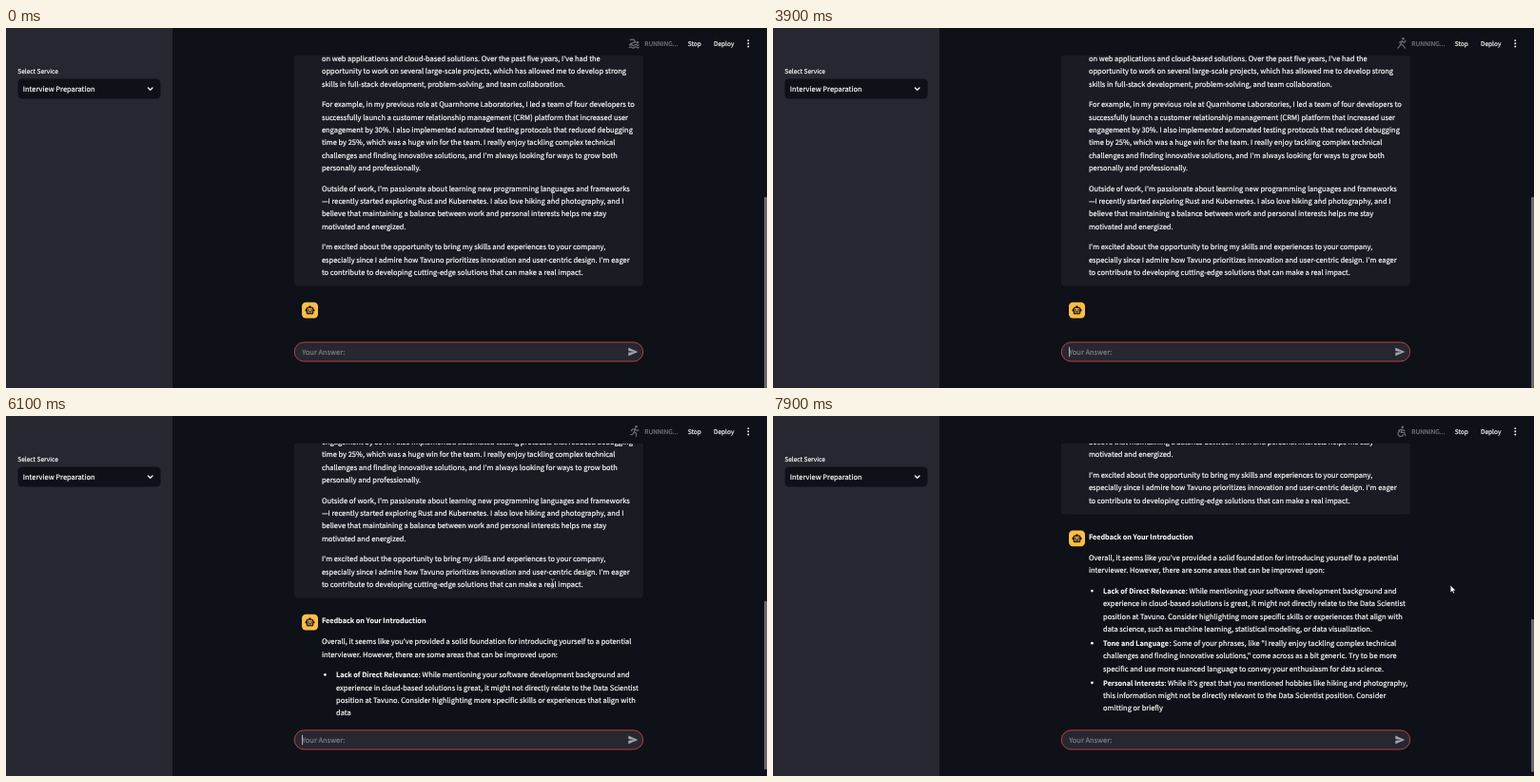
These frames come from a looping animation (800x379 px, 8 s). An HTML page:

```html
<!DOCTYPE html>
<html lang="en">
<head>
<meta charset="utf-8">
<title>Interview Preparation</title>
<style>
  html, body { margin: 0; width: 100%; height: 100%; overflow: hidden; background: #0e1117; }
  svg { display: block; width: 100vw; height: 100vh; }
  text {
    font: 7.49px "Noto Sans CJK JP", "Noto Sans CJK SC", "Noto Sans CJK", "Open Sans", sans-serif;
    color: #fafafa;
    fill: currentColor;
    stroke: currentColor;
    stroke-width: .2px;
    text-rendering: geometricPrecision;
    white-space: pre;
  }
  .small { font-size: 6.55px; }
  .bold { font-weight: 700; font-size: 7.25px; stroke-width: .1px; }
  .line { fill: none; stroke-linecap: round; stroke-linejoin: round; }
</style>
</head>
<body>
<svg viewBox="0 0 800 379" preserveAspectRatio="none">
  <defs>
    <clipPath id="view"><rect x="175" y="29" width="622" height="293.5"/></clipPath>
  </defs>
  <rect width="800" height="379" fill="#0e1117"/>

  <rect width="175" height="379" fill="#262730"/>
  <text class="small" x="12.3" y="47.9">Select Service</text>
  <rect x="12.5" y="53.5" width="150" height="21" rx="4.2" fill="#0e1117"/>
  <text x="17.8" y="66.9">Interview Preparation</text>
  <path class="line" d="M149.4 63l2.3 2.3l2.3-2.3" stroke="#fafafa" stroke-width="1.3"/>

  <g clip-path="url(#view)">
    <g id="page">
      <rect x="303" y="-200" width="367" height="471.8" rx="4.2" fill="#1a1c24"/>
      <g id="answer"></g>
      <rect x="311" y="288.7" width="17" height="16.8" rx="4.2" fill="#ffbd45"/>
      <path transform="translate(314.1 291.7) scale(.45)" fill="#0e1117" fill-rule="evenodd" stroke="#0e1117" stroke-width=".6"
        d="M20 9V7c0-1.1-.9-2-2-2h-3c0-1.66-1.34-3-3-3S9 3.34 9 5H6c-1.1 0-2 .9-2 2v2c-1.66 0-3 1.34-3 3s1.34 3 3 3v4c0 1.1.9 2 2 2h12c1.1 0 2-.9 2-2v-4c1.66 0 3-1.34 3-3s-1.34-3-3-3zM18 19H6V7h12zM9 13a1.5 1.5 0 1 1 0-3a1.5 1.5 0 0 1 0 3zM15 13a1.5 1.5 0 1 1 0-3a1.5 1.5 0 0 1 0 3zM8 15h8v2H8z"/>
      <g id="feedback"></g>
    </g>
  </g>

  <rect x="303.2" y="330.8" width="366.5" height="20.2" rx="10.1" fill="#262730" stroke="#ff4b4b" stroke-width=".7"/>
  <text x="311.2" y="343.6" style="color:#7d7e84">Your Answer:</text>
  <path id="caret" d="M311.6 335.8v10.4" stroke="#fafafa" stroke-width=".7"/>
  <path d="M654.3 336.5L664.3 340.9L654.3 345.3V341.8L661 340.9L654.3 340Z" fill="#a3a5ab"/>

  <g id="sport" class="line" stroke="#6b6e74" stroke-width="1.2">
    <path id="limbs"/>
    <circle id="head" r="1.3" fill="#6b6e74" stroke="none"/>
  </g>
  <text class="small" x="671.3" y="18.5" style="color:#777a80">RUNNING...</text>
  <text class="small" x="716.7" y="18.5">Stop</text>
  <text class="small" x="743.9" y="18.5">Deploy</text>
  <g fill="#fafafa">
    <circle cx="780.3" cy="13.1" r=".95"/><circle cx="780.3" cy="16.3" r=".95"/><circle cx="780.3" cy="19.5" r=".95"/>
  </g>

  <rect id="thumb" x="797" width="3" rx="1" fill="#66686d"/>
  <g id="pointer">
    <path id="arrow" d="M0 0V7.6L1.8 6L3 8.5L4.2 8L3.1 5.6H5.4Z" fill="#fff" stroke="#111" stroke-width=".4"/>
    <path id="beam" class="line" d="M-1.4-5.4Q0-5.4 0-4.5Q0-5.4 1.4-5.4M0-4.5V3.6M-1.4 4.4Q0 4.4 0 3.5Q0 4.4 1.4 4.4" stroke="#b9bbc0" stroke-width=".6"/>
  </g>
</svg>
<script>
const LOOP = 8000, TICK = 100, LINE = 13.34, GAP = 8.34, ITEM_GAP = 1.67;
const LEFT = 331.9, INDENT = 347, FIRST = 298.2, FLOOR = 310.4;
const $ = id => document.getElementById(id);
const clamp = v => Math.max(0, Math.min(1, v));
const ease = v => v * v * (3 - 2 * v);

function make(parent, tag, attrs) {
  const el = document.createElementNS("http://www.w3.org/2000/svg", tag);
  for (const k in attrs) el.setAttribute(k, attrs[k]);
  return parent.appendChild(el);
}

const answer = [
  ["on web applications and cloud-based solutions. Over the past five years, I've had the",
   "opportunity to work on several large-scale projects, which has allowed me to develop strong",
   "skills in full-stack development, problem-solving, and team collaboration."],
  ["For example, in my previous role at Quarnhome Laboratories, I led a team of four developers to",
   "successfully launch a customer relationship management (CRM) platform that increased user",
   "engagement by 30%. I also implemented automated testing protocols that reduced debugging",
   "time by 25%, which was a huge win for the team. I really enjoy tackling complex technical",
   "challenges and finding innovative solutions, and I'm always looking for ways to grow both",
   "personally and professionally."],
  ["Outside of work, I'm passionate about learning new programming languages and frameworks",
   "\u2014I recently started exploring Rust and Kubernetes. I also love hiking and photography, and I",
   "believe that maintaining a balance between work and personal interests helps me stay",
   "motivated and energized."],
  ["I'm excited about the opportunity to bring my skills and experiences to your company,",
   "especially since I admire how Tavuno prioritizes innovation and user-centric design. I'm eager",
   "to contribute to developing cutting-edge solutions that can make a real impact."]
];

const feedback = [
  { bold: "Feedback on Your Introduction", lines: [""], gap: GAP + .3 },
  { lines: [
    "Overall, it seems like you've provided a solid foundation for introducing yourself to a potential",
    "interviewer. However, there are some areas that can be improved upon:"], gap: GAP },
  { bold: "Lack of Direct Relevance", restX: 433.8, gap: ITEM_GAP, lines: [
    ": While mentioning your software development background and",
    "experience in cloud-based solutions is great, it might not directly relate to the Data Scientist",
    "position at Tavuno. Consider highlighting more specific skills or experiences that align with",
    "data science, such as machine learning, statistical modeling, or data visualization."] },
  { bold: "Tone and Language", restX: 416.7, gap: ITEM_GAP, lines: [
    ": Some of your phrases, like \"I really enjoy tackling complex technical",
    "challenges and finding innovative solutions,\" come across as a bit generic. Try to be more",
    "specific and use more nuanced language to convey your enthusiasm for data science."] },
  { bold: "Personal Interests", restX: 411.2, gap: ITEM_GAP, lines: [
    ": While it's great that you mentioned hobbies like hiking and photography,",
    "this information might not be directly relevant to the Data Scientist position. Consider",
    "omitting or briefly"] }
];

const split = s => s ? s.split(" ") : [];
const answerLines = [], rows = [];

let y = 34.9;
for (const para of answer) {
  for (const line of para) {
    const el = make($("answer"), "text", { x: LEFT, y });
    el.textContent = line;
    answerLines.push({ el, y });
    y += LINE;
  }
  y += GAP;
}

// Every row knows the index of its first word in the stream.
let count = 0;
y = FIRST;
for (const block of feedback) {
  const item = !!block.restX, x = item ? INDENT : LEFT;
  block.lines.forEach((line, i) => {
    const head = i ? [] : split(block.bold), body = split(line);
    const row = { y, start: count, head, body, lead: item && !i ? 1 : 0 };
    row.el = make($("feedback"), "g", {});
    if (row.lead) make(row.el, "circle", { cx: 335.4, cy: y - 2.9, r: 1.4, fill: "#fafafa" });
    row.headEl = make(row.el, "text", { x, y, class: "bold" });
    row.bodyEl = make(row.el, "text", { x: head.length && item ? block.restX : x, y });
    count += row.lead + head.length + body.length;
    rows.push(row);
    y += LINE;
  });
  y += block.gap;
}

// Words streamed by time in ms.
const pace = [[4650, 0], [5300, 31.05], [6100, 72.66], [6700, 101.1], [7900, 157.1], [8000, 161]];
function wordsAt(t) {
  for (let i = 1; i < pace.length; i++) {
    const [t0, n0] = pace[i - 1], [t1, n1] = pace[i];
    if (t <= t1) return n0 + (n1 - n0) * clamp((t - t0) / (t1 - t0));
  }
  return count;
}

const wheel = (x, y, r) => `M${x - r} ${y}a${r} ${r} 0 1 0 ${2 * r} 0a${r} ${r} 0 1 0 ${-2 * r} 0`;
const waves = (x, y) => `M${x} ${y}q1.4-1.2 2.7 0t2.7 0t2.7 0t1.6-.5`;
const bike = wheel(657.2, 18.6, 2.7) + wheel(664.2, 18.6, 2.7);
const chair = "M661 13.8L660.3 17.3H663.6L665 20.8M661 14.6L664 15.4M659 16.3";
const sports = [
  { until: 1200, head: [664, 15.2], poses: [
    "M656.2 12.4L660 12.2L662 14.8M656.5 16.6L661.5 14.6" + waves(655.4, 18) + waves(655.4, 20.5),
    "M657.8 11.8L660.4 13L662 15M656.5 16.6L661.5 14.8" + waves(655.4, 18.3) + waves(655.4, 20.7)] },
  { until: 3000, head: [662.3, 11.2], poses: [
    bike + "M664.5 14.7H662L660.6 13L658.6 15L660.8 16.6L660.4 19.2",
    bike + "M664.5 14.7H662L660.6 13L658.6 15L661 16.4V18.6"] },
  { until: 5700, head: [662.4, 11.3], poses: [
    "M661.5 13.4L660 16.7L662.5 18.4L663.5 21M660 16.7L659 19L656.6 20.5M661.3 13.8L658.2 14.6M661.5 14L664.4 16",
    "M661.3 13.4L660 16.7L662.3 18.2L664.2 21.2M660 16.7L658.6 19.4L656.8 21.2M661.3 13.8L658.4 15.2M661.3 14L663.8 15.6L665 13.2"] },
  { until: 6400, head: [662.5, 11.3], poses: [
    "M661.5 13.3L660.3 16.6L661.8 18.6L661 21.3M660.3 16.6L659 18.4L656.4 18M661.3 13.6L659 15.6M661.4 13.8L664 15.6",
    "M661.5 13.3L660.3 16.6L662.6 18.2L662.4 21.2M660.3 16.6L659.2 19L656.6 19.8M661.3 13.5L658.6 13.8L657.4 15.6M661.4 13.8L663 15.4L665 15"] },
  { until: LOOP, head: [661.8, 11.8], poses: [
    chair + "M658.8 15.9a2.9 2.9 0 1 0 3.9 3.6M660.8 14L657.8 13.6",
    chair + "M658.8 15.9a2.9 2.9 0 1 0 3.9 3.6M660.8 14L657.6 15"] }
];

function drawSport(t) {
  const s = sports.find(s => t < s.until);
  $("limbs").setAttribute("d", s.poses[Math.floor(t / TICK) % 2]);
  $("head").setAttribute("cx", s.head[0]);
  $("head").setAttribute("cy", s.head[1]);
}

// Reveals the streamed words; returns the scroll offset and the last baseline.
function drawFeedback(n) {
  const shown = Math.floor(n);
  let scroll = 0, last = FIRST;
  for (const r of rows) {
    const left = shown - r.start;
    r.el.setAttribute("visibility", left > 0 ? "visible" : "hidden");
    const words = Math.max(0, left - r.lead);
    r.headEl.textContent = r.head.slice(0, words).join(" ");
    r.bodyEl.textContent = r.body.slice(0, Math.max(0, words - r.head.length)).join(" ");
    if (left > 0) {
      last = r.y;
      scroll += (Math.max(0, r.y - FLOOR) - scroll) * clamp((n - r.start) / 2.6);
    }
  }
  return { scroll, last };
}

function drawPointer(t, scroll) {
  const k = ease(clamp((t - 6200) / 400));
  const px = 574.6 + 137.6 * k, py = 177 + 1.2 * k;
  const overText = answerLines.some(l => {
    const dy = py + scroll - l.y;
    return dy > -9.6 && dy < 3.7 && px < LEFT + l.el.getComputedTextLength();
  });
  $("pointer").setAttribute("transform", `translate(${px} ${py})`);
  $("beam").setAttribute("visibility", overText ? "visible" : "hidden");
  $("arrow").setAttribute("visibility", overText ? "hidden" : "visible");
}

function draw(time) {
  const t = Math.floor((time % LOOP) / TICK) * TICK;
  const { scroll, last } = drawFeedback(wordsAt(t));
  $("page").setAttribute("transform", `translate(0 ${-scroll})`);

  const ratio = 379 / Math.max(715, last + 414.4);
  $("thumb").setAttribute("y", (336 + scroll) * ratio);
  $("thumb").setAttribute("height", 379 * ratio);

  $("caret").setAttribute("visibility", t % 1063 >= 531 ? "visible" : "hidden");
  drawSport(t);
  drawPointer(t, scroll);
}

const begin = performance.now();
function loop() {
  draw(performance.now() - begin);
  requestAnimationFrame(loop);
}
loop();
</script>
</body>
</html>
```
